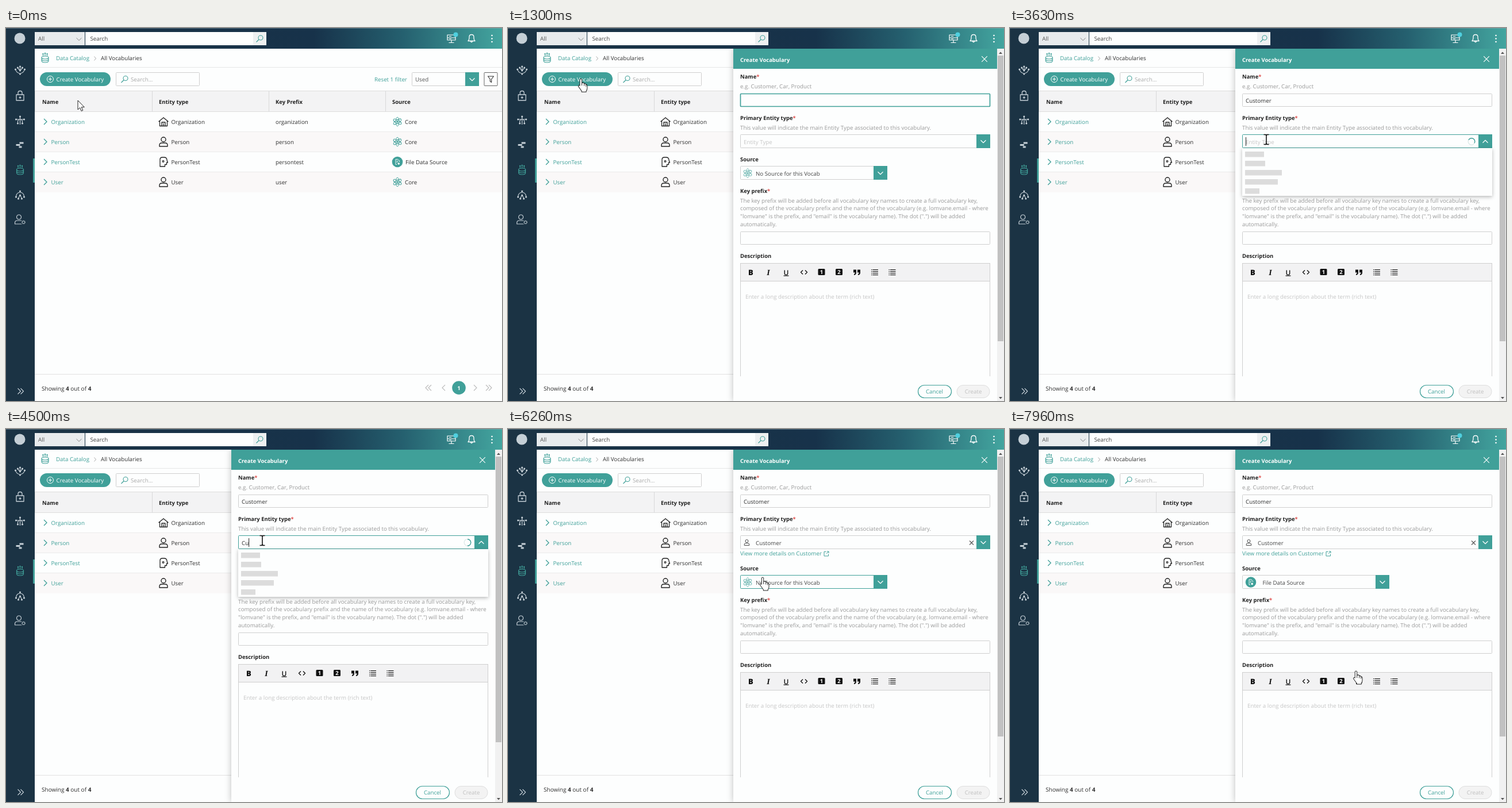
Recreate the animation shown at these times as an HTML page. Size 863 by 649 pixels, loop 8 s.

```html
<!DOCTYPE html>
<html lang="en">
<head>
<meta charset="utf-8">
<title>Create vocabulary</title>
<style>
html, body { margin: 0; width: 100%; height: 100%; overflow: hidden; background: #fdfefe; }
svg { display: block; width: 863px; height: 649px; }
text { font: 9.75px "Open Sans", "Noto Sans", sans-serif; text-rendering: geometricPrecision; white-space: pre; }
text.b { font-size: 9.45px; }
.b { font-weight: 700; }
.m { text-anchor: middle; }
.drop { filter: drop-shadow(0 2px 3px rgba(0, 0, 0, .28)); }
.sheet { filter: drop-shadow(0 0 6px rgba(0, 0, 0, .25)); }
</style>
</head>
<body>
<svg id="stage" viewBox="0 0 863 649"></svg>
<script>
const TEAL = '#40a099', INK = '#2f2f2f', SOFT = '#444', HINT = '#999', FAINT = '#c6c6c6', LINE = '#cfcfcf', PALE = '#c5cfd6', PAPER = '#fdfefe';
const LOOP = 8000;
const $ = id => document.getElementById(id);

// Markup helpers
const text = (x, y, s, fill = INK, attr = '') => `<text x="${x}" y="${y}" fill="${fill}" ${attr}>${s}</text>`;
const bold = (x, y, s, fill = '#222') => text(x, y, s, fill, 'class="b"');
const rect = (x, y, w, h, fill, attr = '') => `<rect x="${x}" y="${y}" width="${w}" height="${h}" fill="${fill}" ${attr}/>`;
const frame = (x, y, w, h, attr = '') => rect(x + .5, y + .5, w - 1, h - 1, PAPER, `stroke="${LINE}" rx="1" ${attr}`);
const dot = (x, y, r, fill, attr = '') => `<circle cx="${x}" cy="${y}" r="${r}" fill="${fill}" ${attr}/>`;
const path = (d, stroke, w = 1.2, fill = 'none', attr = '') =>
  `<path d="${d}" fill="${fill}" stroke="${stroke}" stroke-width="${w}" stroke-linejoin="round" ${attr}/>`;
const at = (x, y, s, attr = '') => `<g transform="translate(${x} ${y})" ${attr}>${s}</g>`;
const group = (id, s, attr = '') => `<g id="${id}" ${attr}>${s}</g>`;
const required = s => `${s}<tspan fill="#e0524f">*</tspan>`;

// Icons, each centred on 0,0
const chevron = (c, w = 1.2, id = '') => path('M-4.5 -2.2L0 2.2L4.5 -2.2', c, w, 'none', id && `id="${id}"`);
const cross = (c, r) => path(`M${-r} ${-r}L${r} ${r}M${r} ${-r}L${-r} ${r}`, c, 1.1);
const lens = c => dot(1.5, -1.5, 4, 'none', `stroke="${c}" stroke-width="1.1"`) + path('M-1.5 1.5L-6 6', c, 1.2);
const store = c => path('M-6 -1v6q0 3 6 3t6 -3v-6q0 -2 -6 -2t-6 2q0 3 6 3t6 -3M-6 2q0 3 6 3t6 -3M-3.5 -3v-3M0 -3v-4M3.5 -3v-3', c, 1.1)
  + [[-3.5, -7], [0, -8], [3.5, -7]].map(p => dot(...p, 1.2, c)).join('');
const person = (c = '#222', w = 1.4) => dot(0, -4, 4, 'none', `stroke="${c}" stroke-width="${w}"`)
  + path('M-7 8v-2q0 -4 4 -4h6q4 0 4 4v2z', c, w);
const house = path('M-8.5 0L0 -7L8.5 0M-6.5 -1.5V7.5H6.5V-1.5M-3 7.5V1H3V7.5M0 7.5V3', '#222', 1.3);
const head = path('M-6 8V-4q0 -4 4 -4h3q5 0 5 5l1.5 4h-2v3.5h-3v3.5z', '#222', 1.3) + dot(-.5, -1, 2, '#222') + dot(-.5, -1, .8, '#fff');
const atom = [30, 90, 150].map(a =>
  `<ellipse rx="7.8" ry="3" fill="none" stroke="${TEAL}" stroke-width=".9" transform="rotate(${a})"/>`).join('') + dot(0, 0, 1.7, TEAL);
const fileIcon = dot(0, 0, 9.3, TEAL) + path('M-3 -4.5h4l2.5 2.5V0M-3 -4.5v9h2M-1.5 -1.5h3M-1.5 .5h2', '#fff', .9) + dot(2.2, 3, 1.8, '#fff');
const baseIcon = dot(0, 0, 9.3, TEAL) + path('M-3.5 -3q0 -1.5 3.5 -1.5t3.5 1.5q0 1.5 -3.5 1.5t-3.5 -1.5v6q0 1.5 3 1.5M-3.5 0q0 1.5 3.5 1.5M3.5 -3v2', '#fff', .9) + dot(2.4, 2.8, 1.8, '#fff');
const listIcon = [-4.5, -1.5, 1.5, 4.5].map(y => rect(-6, y - .5, 1.4, 1.1, '#111') + rect(-3.6, y - .5, 9.6, 1.1, '#111')).join('');
const skip = (c, d) => path(`M${-4 * d} -5l${5 * d} 5l${-5 * d} 5M${d} -5l${5 * d} 5l${-5 * d} 5`, c, 1.1);
const dots = (list, c) => list.map(([x, y]) => dot(x, y, 1.6, c)).join('');

function topBar() {
  return rect(0, 0, 863, 36, 'url(#bar)') + rect(0, 0, 863, 1, '#8fa3ab', 'opacity=".5"')
    + dot(24, 18, 9.5, PALE)
    + rect(50, 7, 87, 23, '#e8ebed') + text(56, 22, 'All', '#555') + at(127, 19.5, chevron('#888', 1))
    + rect(138, 7, 292, 23, PAPER) + text(146.5, 22.3, 'Search', SOFT)
    + rect(430, 7, 23, 23, '#eef0f1') + at(441.5, 18.5, lens(TEAL))
    + at(775, 18, path('M-7 -6h14v5h-14zM-7 -1h14v4h-14zM0 3v4M-4.5 7.5h9M-4 -3.5h4M-4 1h4', '#fff', 1.2)) + dot(782.5, 11.5, 4, '#4fd0df')
    + at(810, 18, path('M-6 4.5q2 -2 2 -5v-2q0 -4 4 -4t4 4v2q0 3 2 5zM-1.8 5q1.8 3.5 3.6 0', '#fff', 1.3))
    + [13, 18.5, 24].map(y => dot(845.5, y, 1.3, '#fff')).join('');
}

function sideBar() {
  const icons = [
    [74, path('M-8 -2q1 5 7 7M8 -2q-1 5 -7 7M0 -6v5M-4 -4l4 4l4 -4', PALE) + dots([[-8, -2], [8, -2], [-4, -5], [4, -5], [0, -7], [0, 0], [0, 6]], PALE)],
    [118, path('M-6.5 -2h13v10h-13zM-3.5 -2v-3q0 -3.5 3.5 -3.5t3.5 3.5v3M0 1v4M-2 3h4', PALE, 1.3)],
    [160, path('M0 -6v14M-7 -1h14M-4 6v-3q0 -4 4 -4t4 4v3', PALE) + dots([[0, -6], [-7, -1], [7, -1], [-4, 6], [4, 6]], PALE)],
    [203, path('M-1 -3h7M-7 .5h7M-2 4h5', PALE, 3)],
    [247, store(TEAL)],
    [290, path('M-7 3q1 -7 7 -7t7 7M-3 6L0 1L3 6', PALE) + dots([[-7, 4], [7, 4], [0, -6], [0, 1], [-3, 7], [3, 7]], PALE)],
    [333, at(-2, 0, person(PALE, 1.2)) + dot(6, 5, 4.5, '#1b3344') + dot(6, 5, 2.4, 'none', `stroke="${PALE}" stroke-width="1.6" stroke-dasharray="1.3 .6"`)],
    [632, skip(PALE, 1)]
  ];
  return rect(0, 36, 50, 613, '#1b3344') + rect(47, 227, 3, 42, TEAL)
    + icons.map(([y, s]) => at(24.5, y, s)).join('');
}

function tablePage() {
  const rows = [
    ['Organization', house, 'organization', 'Core'], ['Person', person(), 'person', 'Core'],
    ['PersonTest', head, 'persontest', 'File Data Source'], ['User', person(), 'user', 'Core']
  ];
  const heads = [[63, 'Name'], [266, 'Entity type'], [469, 'Key Prefix'], [672, 'Source']];
  return rect(50, 36, 813, 613, PAPER)
    + at(68, 52, store(TEAL)) + text(87, 55.5, 'Data Catalog', TEAL) + path('M153.5 49.5l3 3.5l-3 3.5', '#aaa', 1) + text(165, 55.8, 'All Vocabularies')
    + rect(50, 68, 813, 1, '#e6e6e6')
    + rect(59, 77, 123, 24, TEAL, 'rx="12" id="button"') + dot(77, 89, 5.5, 'none', 'stroke="#fff"') + path('M74 89h6M77 86v6', '#fff', 1.1)
    + text(87.5, 92.5, 'Create Vocabulary', '#fff')
    + frame(191, 77, 146, 24) + at(206.5, 89, lens(TEAL)) + text(217, 92.5, 'Search...', '#aaa')
    + text(641, 92.5, 'Reset 1 filter', TEAL)
    + frame(706, 77, 117, 24) + text(712, 93, 'Used', '#555') + rect(799, 77, 24, 24, TEAL) + at(811, 89.5, chevron('#fff'))
    + rect(832, 77.5, 23, 23, PAPER, 'stroke="#666" rx="1"') + path('M838.5 84h10l-3.8 5v5.5l-2.4 -1.7v-3.8z', '#333', 1.1)
    + rect(50, 109, 813, 37, '#f3f3f4') + rect(50, 109, 813, 1, '#ddd') + rect(50, 145, 813, 1, '#ddd')
    + [50, 254, 457, 660].map(x => rect(x, 110, 1, 35, '#d9d9d9')).join('')
    + heads.map(([x, s]) => bold(x, 131.5, s)).join('')
    + rows.map(([name, icon, key, source], i) => {
      const y = 163 + 35 * i, file = source !== 'Core';
      return rect(50, y - 17, 813, 35, i % 2 ? '#faf8f8' : PAPER) + rect(50, y + 17, 813, i < 3 ? 1 : 0, '#ebebeb')
        + path(`M66 ${y - 5}l5 5l-5 5`, TEAL, 1.4) + text(78.5, y + 3.5, name, TEAL)
        + at(274, y, icon) + text(287.5, y + 3.5, name) + text(469, y + 3.5, key)
        + at(681, y, file ? fileIcon : atom) + text(file ? 695 : 694, y + 3.5, source);
    }).join('')
    + rect(50, 602, 813, 1, '#e2e2e2')
    + text(62, 630.5, 'Showing <tspan class="b">4</tspan> out of <tspan class="b">4</tspan>', INK, 'style="font-size:10px"')
    + at(736, 626, skip('#bbb', -1)) + path('M764 621l-5 5l5 5M814 621l5 5l-5 5', '#bbb', 1.1) + at(839, 626, skip('#bbb', 1))
    + dot(788, 626, 11.8, TEAL) + text(788, 629.5, '1', '#fff', 'class="m b"');
}

function editor() {
  const mark = (x, s, style) => text(x, 429.5, s, '#111', `class="m" style="${style}"`);
  const badge = (x, n) => rect(x - 6, 419, 12, 11, '#111', 'rx="1.5"') + text(x, 428, n, '#fff', 'class="m b"');
  const quote = 'M-6 -4.5h5v5q0 4 -4 4.5v-2q2 -.5 2 -2.5h-3zM1 -4.5h5v5q0 4 -4 4.5v-2q2 -.5 2 -2.5h-3z';
  return bold(404, 400, 'Description') + frame(404, 409, 435, 260)
    + rect(404.5, 409.5, 434, 31, '#f2f2f3', `stroke="${LINE}"`)
    + mark(422.5, 'B', 'font-size:13px;font-weight:800')
    + mark(453, 'I', 'font:italic bold 14px &quot;Liberation Serif&quot;,serif')
    + mark(484, 'U', 'font-size:12px;font-weight:600;text-decoration:underline')
    + at(515, 425, path('M-2 -3.5l-3.5 3.5l3.5 3.5M2 -3.5l3.5 3.5l-3.5 3.5', '#111', 1.4))
    + badge(545.5, 1) + badge(576, 2)
    + at(607, 425, path(quote, 'none', 0, '#111')) + at(638, 425, listIcon) + at(668.5, 425, listIcon)
    + text(413, 471, 'Enter a long description about the term (rich text)', FAINT);
}

function lowerForm() {
  const help = [
    'The key prefix will be added before all vocabulary key names to create a full vocabulary key,',
    'composed of the vocabulary prefix and the name of the vocabulary (e.g. lomvane.email - where',
    '"lomvane" is the prefix, and "email" is the vocabulary name). The dot (".") will be added',
    'automatically.'
  ];
  return bold(404, 231.5, 'Source') + frame(404, 240, 256, 24, 'id="sourceBox"')
    + group('noSource', at(417, 252.5, atom, 'opacity=".75"') + text(431, 256.5, 'No Source for this Vocab', SOFT))
    + group('fileSource', at(419, 252.5, fileIcon) + text(439.5, 256.5, 'File Data Source', SOFT))
    + rect(410, 245, 1, 15, '#222', 'id="sourceCaret"')
    + rect(636, 240, 24, 24, TEAL) + at(648, 252.5, chevron('#fff', 1.2, 'sourceArrow'))
    + bold(404, 286.5, required('Key prefix'))
    + help.map((s, i) => text(404, 303.5 + 13.9 * i, s, HINT)).join('')
    + frame(404, 354, 435, 23) + editor();
}

function entityLists() {
  const names = ['Activity', 'Announcement', 'Answer', 'Calendar', 'Category', 'Channel', 'Comment'];
  const bars = [33, 35, 64, 57, 25];
  const small = (y, s, icon) => at(416, y, `<g transform="scale(.65)">${icon}</g>`) + text(431, y + 3.5, s, SOFT);
  const sheet = h => rect(404, 209, 435, h, PAPER, 'class="drop"');
  return group('entityAll', sheet(195) + names.map((s, i) => small(223 + 27.5 * i, s, head)).join(''))
    + group('entityWait', sheet(83) + bars.map((w, i) => rect(409, 215 + 16 * i, w, 9.5, '#dcdcdc')).join(''))
    + group('entityHit', sheet(32) + small(225, 'Customer', person(SOFT)));
}

function sourceList() {
  const square = c => rect(-8, -8, 16, 16, c), disc = c => dot(0, 0, 9, c);
  const items = [
    ['No Source for this Vocab', atom], ['Assessment', disc(TEAL)], ['Bokvi', square('#4a6aa8')], ['Tallowix', square('#4a7fd8')],
    ['Common Data Model', disc('#1d8a3c')], ['Merchants Ledger', disc('#2b2b2b')], ['BQK', square('#333')],
    ['Database Data Source', baseIcon], ['Moth Moth Run', disc('#de5833')], ['File Data Source', fileIcon],
    ['Manual Entry', disc(TEAL)], ['Query Source', baseIcon], ['Stream Source', fileIcon]
  ];
  return rect(404, 278, 256, 219, PAPER, 'class="drop"')
    + '<g clip-path="url(#listClip)">' + group('items', items.map(([s, icon], i) => {
      const y = 293.7 + 29.25 * i;
      return at(418, y, icon) + text(439, y + 3.6, s, SOFT);
    }).join('')) + '</g>'
    + rect(648, 279, 11, 217, '#f4f4f4') + path('M650.8 286l2.7 -3l2.7 3zM650.8 489l2.7 3l2.7 -3z', 'none', 0, SOFT)
    + rect(649, 289, 9.5, 64, '#7b7b7b', 'id="listThumb"');
}

function panel() {
  return rect(392, 36, 471, 613, PAPER, 'class="sheet"')
    + bold(404, 88.3, required('Name')) + text(404, 105, 'e.g. Customer, Car, Product', HINT)
    + frame(404, 114, 435, 23, 'id="nameBox"') + text(410, 129.7, '', INK, 'id="name"') + rect(410, 118, 1, 15, '#222', 'id="nameCaret"')
    + bold(404, 160, required('Primary Entity type')) + text(404, 177, 'This value will indicate the main Entity Type associated to this vocabulary.', HINT)
    + group('lower', lowerForm())
    + frame(404, 185, 435, 24, 'id="entityBox"')
    + text(410, 201.5, 'Entity Type', FAINT, 'id="entityHint"') + text(410, 201.5, '', INK, 'id="entity"') + rect(410, 190, 1, 15, '#222', 'id="entityCaret"')
    + group('spinner', dot(0, 0, 5.8, 'none', 'stroke="#dce9e8" stroke-width="1.3"') + path('M0 -5.8A5.8 5.8 0 0 1 0 5.8', TEAL, 1.4))
    + group('chosen', at(415.5, 197.5, `<g transform="scale(.62)">${person(SOFT, 1.6)}</g>`) + text(431, 201.5, 'Customer', SOFT) + at(806.5, 198, cross('#555', 3.5)))
    + group('details', text(404, 220, 'View more details on Customer', TEAL) + path('M553.5 213.5h-3.5v7.5h7.5v-3.5M554 217l4 -4M555 213h3v3', TEAL, 1))
    + rect(815, 185, 24, 24, TEAL) + at(827, 197.5, chevron('#fff', 1.2, 'entityArrow'))
    + rect(393, 606, 458, 43, PAPER)
    + rect(713.5, 621.5, 58, 22, PAPER, `rx="11" stroke="${TEAL}" stroke-width="1.2"`) + text(742, 636, 'Cancel', TEAL, 'class="m"')
    + rect(781, 621.5, 57, 22, '#f3f3f3', 'rx="11" stroke="#dedede"') + text(809.5, 636, 'Create', '#c0c0c0', 'class="m"')
    + rect(392, 36, 459, 35, TEAL) + bold(404, 58.5, 'Create Vocabulary', '#fff') + at(829, 54, cross('#fff', 4.8))
    + rect(851, 36, 12, 613, '#f1f1f1') + path('M854 45l3 -3.5l3 3.5zM854 642l3 3.5l3 -3.5z', 'none', 0, '#555')
    + rect(852, 48, 10, 497, '#c1c1c1', 'id="thumb"')
    + entityLists() + group('sourceList', sourceList());
}

const cursors = {
  arrow: path('M0 0V16l3.7 -3.4l2.4 5.8l2.6 -1.1l-2.4 -5.6h5z', '#222', 1, '#fff'),
  hand: path('M-2 1.5q2 -3 4 0V8l1 -1q3 -.5 3.5 1.5q3 -.5 3.5 1.5q2.5 -.3 2.5 2.5v4q0 3 -2 5v1.5h-9v-1.5l-6.5 -8q0 -3 3 -1.5zM2 8v4M6.5 9v3.5M10 10.5v3', '#222', 1.1, '#fff', 'transform="scale(.88 1)"'),
  beam: path('M-4.5 -8.5h3l1.5 1l1.5 -1h3M0 -7.5v15M-4.5 8.5h3l1.5 -1l1.5 1h3', '#111', 1.6)
};

$('stage').innerHTML = `<defs>
  <linearGradient id="bar"><stop offset="0" stop-color="#1b3344"/><stop offset=".62" stop-color="#17324a"/><stop offset=".8" stop-color="#25606f"/><stop offset="1" stop-color="#43a59f"/></linearGradient>
  <clipPath id="listClip"><rect x="404" y="279" width="244" height="218"/></clipPath></defs>`
  + tablePage() + group('panel', panel()) + topBar() + sideBar()
  + group('cursor', Object.entries(cursors).map(([id, s]) => group(id, s)).join(''));

// time, x, y, shape until the next step
const track = [
  [0, 125, 126, 'arrow'], [160, 125, 126, 'arrow'], [400, 126, 97, 'hand'], [500, 126, 88, 'hand'],
  [1300, 126, 88, 'hand'], [1380, 190, 105, 'arrow'], [1800, 540, 188, 'beam'], [1960, 586, 195, 'beam'],
  [2100, 586, 195, 'beam'], [2260, 437, 125, 'beam'], [3200, 437, 125, 'beam'], [3480, 446, 194, 'beam'],
  [5200, 446, 194, 'beam'], [5350, 445, 212, 'hand'], [5480, 445, 222, 'hand'], [5720, 445, 222, 'hand'],
  [6000, 444, 262, 'hand'], [6260, 443, 258, 'hand'], [6500, 443, 258, 'hand'], [6600, 500, 270, 'arrow'],
  [6880, 653, 301.5, 'arrow'], [6920, 653, 301.5, 'arrow'], [7060, 653, 311, 'arrow'], [7100, 653, 311, 'arrow'],
  [7400, 653, 339, 'arrow'], [7480, 653, 339, 'arrow'], [7620, 625, 390, 'hand'], [7800, 602, 421, 'hand'], [LOOP, 602, 421, 'hand']
];

function pointer(t) {
  const i = track.findIndex((k, n) => t < track[n + 1][0]);
  const [t0, x0, y0, shape] = track[i], [t1, x1, y1] = track[i + 1];
  const k = (t - t0) / (t1 - t0);
  return { x: x0 + (x1 - x0) * k, y: y0 + (y1 - y0) * k, shape };
}

const show = (id, on) => { $(id).style.display = on ? '' : 'none'; };
const move = (id, x, y) => $(id).setAttribute('transform', `translate(${x} ${y})`);
const flip = (id, up) => $(id).setAttribute('transform', `scale(1 ${up ? -1 : 1})`);
const blink = (t, from) => Math.floor((t - from) / 200) % 2 === 0;
const typed = (t, start) => t < start ? '' : 'Customer'.slice(0, 1 + Math.floor((t - start) / 91.4));

function border(id, lit, width = 1) {
  $(id).setAttribute('stroke', lit ? TEAL : LINE);
  $(id).setAttribute('stroke-width', lit ? width : 1);
}

function field(id, value, caretOn) {
  const el = $(id);
  if (el.textContent !== value) el.textContent = value;
  show(id + 'Caret', caretOn);
  if (caretOn) $(id + 'Caret').setAttribute('x', 410 + (value ? el.getComputedTextLength() : 0));
}

function draw(t) {
  const p = pointer(t);
  const slide = Math.min(1, Math.max(0, (t - 830) / 300));
  show('panel', t >= 830);
  move('panel', 478 * (1 - slide) ** 3, 0);
  $('button').setAttribute('fill', t >= 660 && t < 830 ? '#38918b' : t >= 400 && t < 660 ? '#3d9a93' : TEAL);

  const nameFocus = t < 3500;
  const nameBlink = t < 2160 ? blink(t, 1100) : t < 2800 || blink(t, 2800);
  border('nameBox', nameFocus, 1.7);
  field('name', typed(t, 2160), nameFocus && t >= 1100 && nameBlink);

  const picked = t >= 5550, open = t >= 3500 && !picked;
  const loading = open && (t < 3700 || (t >= 4360 && t < 4950));
  const entityBlink = t < 4360 ? t < 3760 || blink(t, 3760) : t < 5000 || blink(t, 5000);
  border('entityBox', open);
  show('entity', !picked);
  field('entity', typed(t, 4360), open && entityBlink);
  show('entityHint', t < 4360);
  show('chosen', picked);
  show('spinner', loading);
  $('spinner').setAttribute('transform', `translate(803 197.5) rotate(${(t - 4500) * .9})`);
  show('entityWait', loading);
  show('entityAll', open && t >= 3700 && t < 4360);
  show('entityHit', open && t >= 4950);
  flip('entityArrow', open);

  const shifted = t >= 5700;
  show('details', shifted);
  move('lower', 0, shifted ? 14 : 0);
  $('thumb').setAttribute('height', shifted ? 487 : 497);

  // The list follows the pointer while its scroll thumb is held
  const done = t >= 7960, listOpen = t >= 6430 && !done;
  const drag = t < 6920 ? 0 : t < 7400 ? p.y - 301.5 : 37.5;
  border('sourceBox', t >= 6030 && !done);
  show('noSource', !done);
  show('fileSource', done);
  show('sourceCaret', listOpen && blink(t, 6230));
  show('sourceList', listOpen);
  flip('sourceArrow', listOpen);
  move('items', 0, -drag * 3.37);
  $('listThumb').setAttribute('y', 289 + drag);

  move('cursor', p.x, p.y);
  Object.keys(cursors).forEach(id => show(id, id === p.shape));
}

const start = performance.now();
function tick() {
  draw((performance.now() - start) % LOOP);
  requestAnimationFrame(tick);
}
tick();
</script>
</body>
</html>
```
